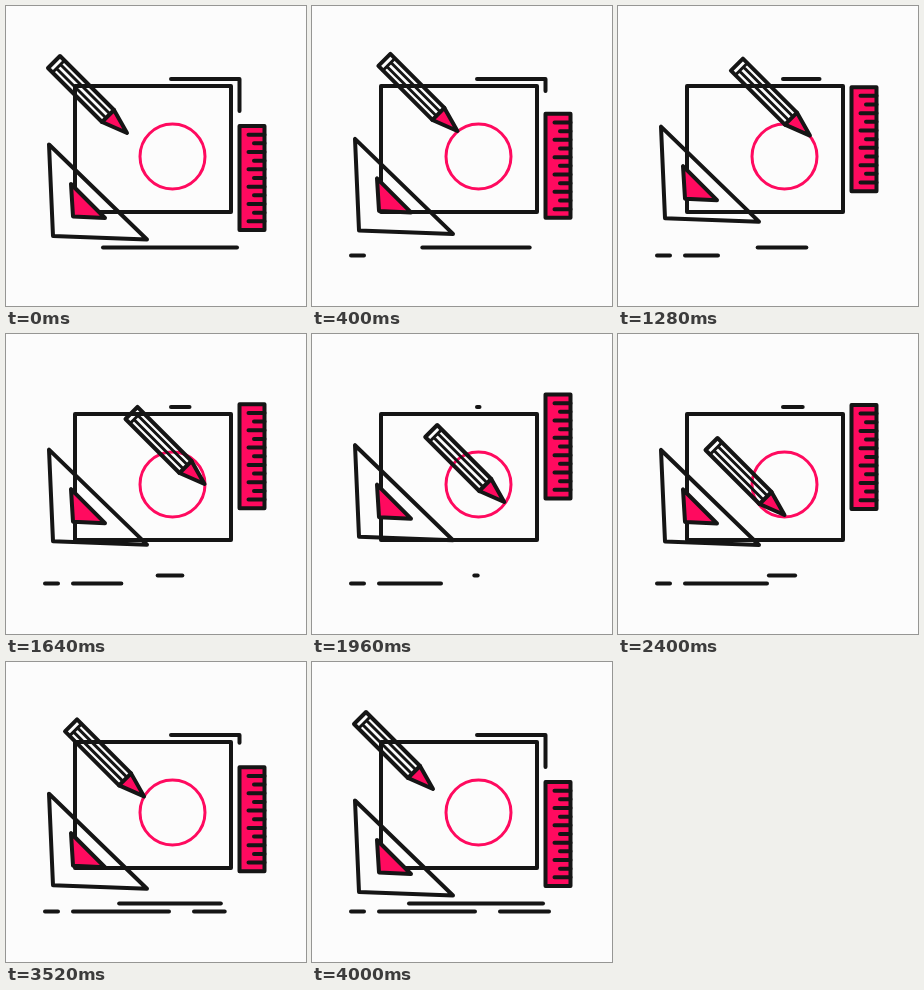
These frames come from a looping animation (300 by 300 pixels, 4.04 s). An HTML page:

```html
<!DOCTYPE html>
<html lang="en">
<head>
<meta charset="utf-8">
<title>Design tools</title>
<style>
  html, body { margin: 0; width: 100%; height: 100%; overflow: hidden; background: #fcfcfc; }
  svg { display: block; width: 100%; height: 100%; fill: none; stroke: #151515; stroke-width: 4; stroke-linecap: round; stroke-linejoin: round; }
  .pink { fill: #ff0a5f; }
  .ring { stroke: #ff0a5f; stroke-width: 3; }
</style>
</head>
<body>
<svg viewBox="0 0 300 300">
  <path id="corner" d="M165 73H233.5V105"/>
  <path id="dashes"/>
  <path id="baseline"/>
  <rect x="69" y="80" width="156" height="126"/>
  <circle class="ring" cx="166.5" cy="150.5" r="32.5"/>
  <g id="square">
    <path d="M43 138.5L47 230L141 233.5Z"/>
    <path class="pink" d="M65 178L67 210.5L99 212Z"/>
  </g>
  <g id="ruler">
    <rect class="pink" x="233.5" y="120" width="25" height="104"/>
    <path id="ticks"/>
  </g>
  <!-- the pencil's tip is its origin -->
  <g id="pencil">
    <path class="pink" d="M-25 -11L-13 -23L0 0Z"/>
    <path d="M-25 -11L-79 -65L-67 -77L-13 -23"/>
    <path stroke-width="3" d="M-74.5 -60.5L-62.5 -72.5M-70.5 -64.5L-21 -15M-66.5 -68.5L-17 -19"/>
  </g>
</svg>
<script>
const LOOP = 4040, END = 4000, TURN = 2010, STEP = 40;
const HOME = [121, 127];
const $ = id => document.getElementById(id);

// Time/value keys: pencil angle around the ring, drawn length of the dashes
const ANGLE = [[370, 45], [400, 48.7], [1280, 142.6], [1960, 216.5], [2400, 270], [3080, 343.6], [3700, 405]];
const DRAWN = [[0, 0], [400, 13], [1280, 46], [1960, 75], [2400, 95], [3080, 123], [END, 158]];
const DASHES = [[39, 13], [67, 96], [188, 49]];

$("ticks").setAttribute("d", Array.from({ length: 11 }, (_, i) =>
  `M${i % 2 ? 248 : 242.5} ${120 + (i + 1) * 104 / 12}H258.5`).join(""));

const mix = (a, b, p) => a + (b - a) * p;

function keyed(keys, t) {
  const i = Math.max(1, keys.findIndex(k => k[0] >= t));
  const [[t0, a], [t1, b]] = [keys[i - 1], keys[i]];
  return mix(a, b, (t - t0) / (t1 - t0));
}

const onRing = deg => {
  const a = deg * Math.PI / 180;
  return [166.5 - 32 * Math.cos(a), 149 - 32 * Math.sin(a)];
};

// Straight in, once round the ring, straight back
function tip(t) {
  const start = ANGLE[0][0], stop = ANGLE[ANGLE.length - 1][0];
  if (t >= start && t <= stop) return onRing(keyed(ANGLE, t));
  const p = t < start ? t / start : (END - t) / (END - stop);
  return onRing(45).map((v, i) => mix(HOME[i], v, p));
}

const move = (id, x, y) => $(id).setAttribute("transform", `translate(${x} ${y})`);

function draw(t) {
  const swing = t < TURN ? t / TURN : (END - t) / (END - TURN);
  const rest = 1 - swing;

  move("ruler", 0, -61 * swing);
  move("square", 0, -28 * swing);
  move("pencil", ...tip(t));

  $("corner").setAttribute("stroke-dasharray", `${100.5 * rest} 300`);
  $("baseline").setAttribute("d", `M${164 - 67 * rest} 241.5H${164 + 67 * rest}`);

  let left = keyed(DRAWN, t), d = "";
  for (const [x, length] of DASHES) {
    if (left > 0) d += `M${x} 249.5h${Math.min(left, length)}`;
    left -= length;
  }
  $("dashes").setAttribute("d", d);
}

const origin = performance.now();
function frame() {
  const t = (performance.now() - origin) % LOOP;
  draw(Math.min(END, Math.floor(t / STEP) * STEP));
  requestAnimationFrame(frame);
}
frame();
</script>
</body>
</html>
```
